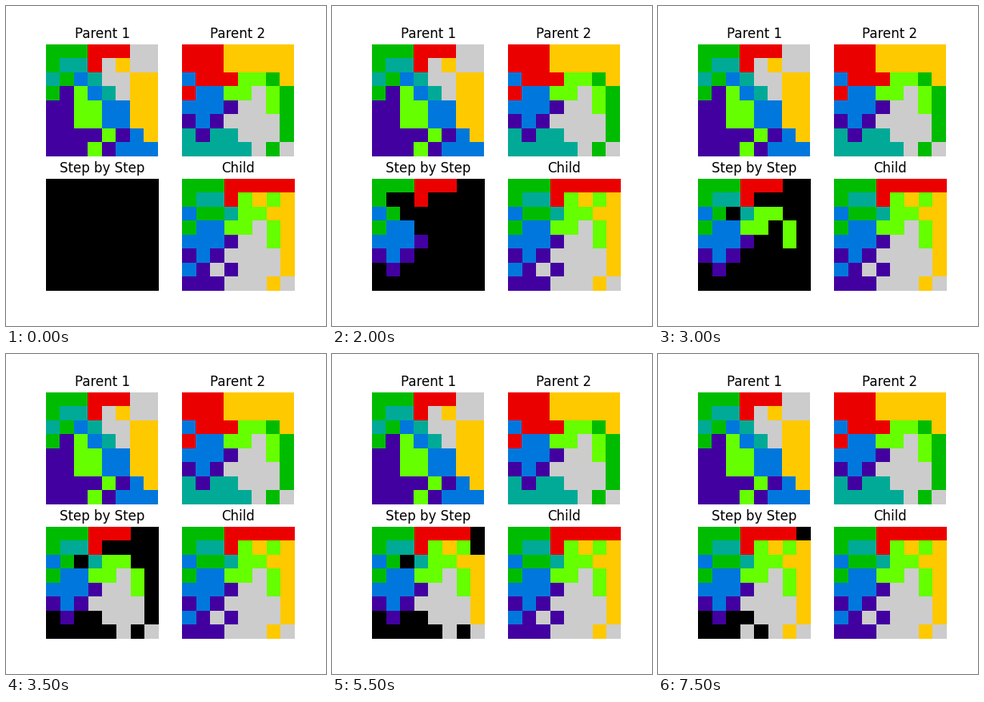
These frames come from a looping animation (400x400 px, 8 s). A matplotlib script:

```python
import numpy as np
import matplotlib.pyplot as plt
from matplotlib.animation import FuncAnimation

plt.rcParams["font.family"] = "DejaVu Sans"

# District numbers, 0 = unassigned
PURPLE, BLUE, TEAL, GREEN, LIME, YELLOW, RED, GRAY = range(1, 9)


def grid(text):
    return np.array([[int(c) for c in row] for row in text.split()])


parent1 = grid("44477788 43378688 34238866 41523866 "
               "11552266 11552266 11115126 11151222")
parent2 = grid("77766666 77766666 27775546 72255854 "
               "22218854 12188884 31338884 33333848")
child = grid("44477777 43375656 24435566 42255856 "
             "22218856 12188886 21818886 11188868")

# Whole districts inherited in turn, then single cells filled in
districts = [(parent2, PURPLE), (parent1, GREEN), (parent2, BLUE), (parent1, RED),
             (parent2, LIME), (parent1, TEAL), (parent2, GRAY), (parent1, YELLOW)]
cells = [(1, 6), (0, 6), (1, 4), (2, 2), (7, 6), (1, 7), (7, 3)]


def build_steps():
    board = np.zeros_like(child)
    steps = [board.copy()]
    for parent, d in districts:
        board[(parent == d) & (board == 0)] = d
        steps.append(board.copy())
    for cell in cells:
        board[cell] = child[cell]
        steps.append(board.copy())
    return steps


steps = build_steps()

fig, axes = plt.subplots(2, 2, figsize=(4, 4), dpi=100)
panels = [("Parent 1", parent1), ("Parent 2", parent2),
          ("Step by Step", steps[0]), ("Child", child)]
images = []
for ax, (title, data) in zip(axes.flat, panels):
    images.append(ax.imshow(data, cmap="nipy_spectral", vmin=0, vmax=8,
                            interpolation="nearest"))
    ax.set_title(title, fontsize=12)
    ax.axis("off")


def update(i):
    images[2].set_data(steps[i])
    return [images[2]]


anim = FuncAnimation(fig, update, frames=len(steps), interval=500,
                     repeat=True, repeat_delay=0)
plt.show()
```
